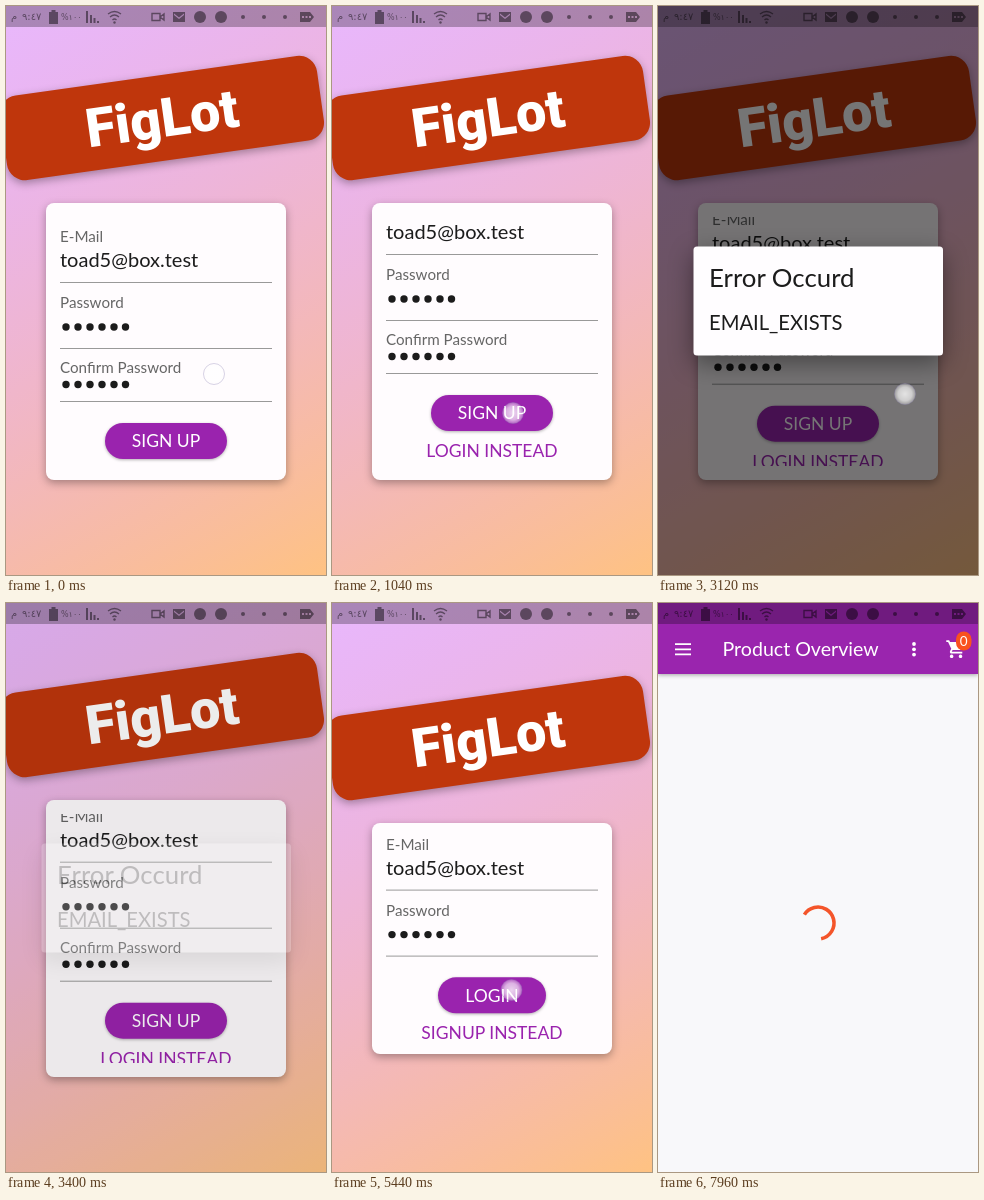
An HTML page that plays this animation: 320x569 px, repeating every 8000 ms.

```html
<!DOCTYPE html>
<html lang="en">
<head>
<meta charset="utf-8">
<style>
  html, body { margin: 0; width: 100%; height: 100%; overflow: hidden; background: #fafafa; }
  svg { display: block; width: 100vw; height: 100vh; font-family: Lato, sans-serif; }
  .label { font-size: 15.2px; fill: #666; }
  .action { font-size: 17.5px; text-anchor: middle; }
  .line { stroke: #999; stroke-width: 1; }
  .brand { font: 900 54px Roboto, sans-serif; text-anchor: middle; fill: #fff; }
  .clock { font: 10px "DejaVu Sans", sans-serif; direction: ltr; unicode-bidi: bidi-override; }
  .raised { filter: drop-shadow(0 3px 4px rgba(0, 0, 0, .32)); }
  .low { filter: drop-shadow(0 1.5px 1.5px rgba(0, 0, 0, .3)); }
  .dialog { filter: drop-shadow(0 8px 12px rgba(0, 0, 0, .4)); }
</style>
</head>
<body>
<svg viewBox="0 0 320 569" preserveAspectRatio="none">
  <defs>
    <linearGradient id="sky" gradientUnits="userSpaceOnUse" x1="0" y1="0" x2="320" y2="569">
      <stop stop-color="#d775ff" stop-opacity=".5"/>
      <stop offset="1" stop-color="#ffbc75" stop-opacity=".9"/>
    </linearGradient>
    <radialGradient id="glow">
      <stop stop-color="#fff" stop-opacity=".8"/>
      <stop offset=".65" stop-color="#fff" stop-opacity=".65"/>
      <stop offset="1" stop-color="#fff" stop-opacity=".3"/>
    </radialGradient>
    <clipPath id="viewport"><rect id="clip" x="50" width="220"/></clipPath>
    <g id="dots">
      <circle cx="60" r="3.7"/><circle cx="72" r="3.7"/><circle cx="84" r="3.7"/>
      <circle cx="96" r="3.7"/><circle cx="108" r="3.7"/><circle cx="119.5" r="3.7"/>
    </g>
  </defs>

  <g id="auth">
    <rect width="320" height="569" fill="#fafafa"/>
    <rect width="320" height="569" fill="url(#sky)"/>
    <g id="banner" class="raised">
      <g transform="translate(156 112) rotate(-8)">
        <rect x="-160" y="-42.7" width="320" height="85.4" rx="18" fill="#bf360c"/>
        <text class="brand" y="19">FigLot</text>
      </g>
    </g>
    <rect id="card" class="raised" x="40" width="240" rx="8" fill="#fffcfe"/>
    <g clip-path="url(#viewport)">
      <g id="form">
        <text class="label" x="54" y="236">E-Mail</text>
        <text x="54" y="261" font-size="20" fill="#1c1c1c">toad5@box.test</text>
        <path class="line" d="M54 276.5H266"/>
        <text class="label" x="54" y="302">Password</text>
        <use href="#dots" y="321" fill="#1c1c1c"/>
        <path class="line" d="M54 342.5H266"/>
        <g id="confirm">
          <text class="label" x="54" y="367">Confirm Password</text>
          <use href="#dots" y="378.5" fill="#1c1c1c"/>
          <path class="line" d="M54 395.5H266"/>
        </g>
        <g id="submit">
          <rect id="pill" class="low" y="417" height="36" rx="18" fill="#9a23ae"/>
          <text id="submitText" class="action" x="160" y="441.3" fill="#fff"></text>
        </g>
        <text id="switchText" class="action" x="160" fill="#9a23ae"></text>
      </g>
    </g>
  </g>

  <g id="shop">
    <rect width="320" height="569" fill="#f8f8fa"/>
    <rect width="320" height="71" fill="#9a25ae" style="filter: drop-shadow(0 1px 2px rgba(0, 0, 0, .35))"/>
    <path d="M17 41.2H33M17 46.3H33M17 51.4H33" stroke="#fff" stroke-width="1.8"/>
    <text x="64.5" y="53.3" font-size="19.6" fill="#fff">Product Overview</text>
    <g fill="#fff">
      <circle cx="256" cy="41" r="1.9"/><circle cx="256" cy="46.3" r="1.9"/><circle cx="256" cy="51.6" r="1.9"/>
      <path transform="translate(287.4 35.5) scale(.889)" d="M1 2v2h2l3.6 7.6-1.35 2.4C4.5 15.4 5.5 17 7 17h12v-2H7.4a.25.25 0 0 1-.2-.4l.9-1.6h7.45c.75 0 1.4-.4 1.75-1l3.58-6.5A1 1 0 0 0 20 4H5.2l-.94-2zM7 18a2 2 0 1 0 .01 0zM17 18a2 2 0 1 0 .01 0z"/>
    </g>
    <rect x="298" y="28.5" width="15.5" height="19" rx="7.7" fill="#f9521f"/>
    <text x="305.7" y="43" font-size="13.5" text-anchor="middle" fill="#fff">0</text>
  </g>

  <circle id="spinner" r="16" pathLength="360" fill="none" stroke="#f4552a" stroke-width="3.6"/>

  <rect width="320" height="21" opacity=".27"/>
  <g opacity=".46">
    <text class="clock" x="5" y="14">م</text>
    <text class="clock" x="16" y="14">٩:٤٧</text>
    <path d="M43 6h2.5v-2h4v2H52v12h-9z"/>
    <text class="clock" x="55" y="14" style="font-size: 8px">%١٠٠</text>
    <path d="M80 5v12h2V5zM84 9v8h2V9zM87.5 12v5h2v-5zM91 15v2h2v-2z"/>
    <path d="M102 8q6.5-5 13 0M104 11q4.5-4 9 0M106.500 14q2-2 4 0" fill="none" stroke="#000" stroke-width="1.3"/>
    <circle cx="108.5" cy="16.5" r="1.2"/>
    <path d="M146 7.5h8v7h-8zM154 11l4-3v6z" fill="none" stroke="#000" stroke-width="1.4"/>
    <path fill-rule="evenodd" d="M167 6h12v10h-12zM168 7.500l5 4 5-4v1.500l-5 4-5-4z"/>
    <circle cx="194" cy="11" r="6"/><circle cx="215" cy="11" r="6"/>
    <circle cx="237" cy="11" r="2"/><circle cx="258" cy="11" r="2"/><circle cx="279" cy="11" r="2"/>
    <path fill-rule="evenodd" d="M294 6h10l4 5-4 5h-10zM296 10v2h2v-2zM299.5 10v2h2v-2zM303 10v2h2v-2z"/>
  </g>

  <rect id="barrier" width="320" height="569"/>
  <g id="alert">
    <rect class="dialog" x="35.5" y="240.5" width="249.5" height="109" rx="3.5" fill="#fffdff"/>
    <text x="51" y="281" font-size="25.8" fill="#1c1c1c">Error Occurd</text>
    <text x="51" y="324" font-size="20.2" fill="#1c1c1c">EMAIL_EXISTS</text>
  </g>

  <circle id="touch" r="10.5" fill="url(#glow)" stroke="#8c84b4" stroke-opacity=".35"/>
</svg>

<script>
const LOOP = 8000;
const SWITCH_AT = 4120, SHOP_AT = 6280;
const $ = id => document.getElementById(id);
const clamp = x => Math.min(1, Math.max(0, x));
const mix = (a, b, p) => a + (b - a) * p;
const set = (id, attrs) => {
  for (const name in attrs) $(id).setAttribute(name, attrs[name]);
};
const show = (id, visible) => set(id, { display: visible ? 'inline' : 'none' });

function bezier(x1, y1, x2, y2) {
  const at = (a, b, s) => 3 * a * s * (1 - s) ** 2 + 3 * b * s * s * (1 - s) + s ** 3;
  return x => {
    let lo = 0, hi = 1;
    for (let i = 0; i < 20; i++) {
      const mid = (lo + hi) / 2;
      if (at(x1, x2, mid) < clamp(x)) lo = mid; else hi = mid;
    }
    return at(y1, y2, lo);
  };
}
const standard = bezier(.4, 0, .2, 1);
const easeIn = bezier(.42, 0, 1, 1);
const easeOut = bezier(0, 0, .58, 1);

const touches = [
  { from: 0, to: 540, x: 208, y: t => mix(368, 326, standard((t - 60) / 420)) },
  { from: 960, to: 1120, x: 181, y: () => 407 },
  { from: 3120, to: 3260, x: 247, y: () => 388 },
  { from: 4000, to: 4140, x: 165, y: () => 453 },
  { from: 5440, to: 5580, x: 179.5, y: () => 387 }
];

// Indeterminate material spinner: the head runs ahead, then the tail catches up.
function drawSpinner(x, y, elapsed) {
  const phase = elapsed / 1333 % 1;
  const head = standard(phase * 2), tail = standard(phase * 2 - 1);
  const start = -90 + 270 * tail + 360 * elapsed / 2222 + 90 * phase;
  const sweep = Math.max(270 * (head - tail), .1);
  set('spinner', {
    transform: `translate(${x} ${y}) rotate(${start})`,
    'stroke-dasharray': `${sweep} 720`
  });
}

function drawForm(t) {
  const login = t >= SWITCH_AT;
  const p = easeIn((t - SWITCH_AT) / 300);
  const loadingSince = t >= 1120 && t < 2040 ? 1120 : t >= 5560 ? 5560 : 0;
  const lift = login ? -53.3 : 0;
  const top = mix(197, 220, p), height = mix(277, 231, p);
  const scroll = t < 1120 ? 28 * standard((t - 100) / 400)
    : login && loadingSince ? 10 : mix(17.3, 12.4, p);
  const shift = 23 * p - scroll;
  const width = login ? 108 : 122;

  set('banner', { transform: `translate(0 ${23 * p})` });
  set('card', { y: top, height });
  set('clip', { y: top + 14, height: height - 28 });
  set('form', { transform: `translate(0 ${shift})` });
  set('submit', { transform: `translate(0 ${lift})` });
  set('pill', { x: 160 - width / 2, width });
  set('switchText', { y: 479 + lift - (loadingSince ? 10.7 : 0) });
  $('submitText').textContent = login ? 'LOGIN' : 'SIGN UP';
  $('switchText').textContent = login ? 'SIGNUP INSTEAD' : 'LOGIN INSTEAD';
  show('confirm', !login);
  show('submit', !loadingSince);
  show('spinner', loadingSince);
  if (loadingSince) {
    const now = login ? t : Math.min(t, 1880);
    drawSpinner(160, 429.7 + lift + shift, now - loadingSince);
  }
}

function draw(t) {
  const inShop = t >= SHOP_AT;
  show('auth', !inShop);
  show('shop', inShop);
  if (inShop) {
    show('spinner', true);
    drawSpinner(160, 320, t - SHOP_AT + 25);
  } else {
    drawForm(t);
  }

  const alert = Math.min(clamp((t - 2000) / 80), clamp((3420 - t) / 140));
  set('barrier', { opacity: .54 * alert });
  set('alert', { opacity: easeOut(alert) });

  const touch = touches.find(({ from, to }) => t >= from && t < to);
  show('touch', touch);
  if (touch) set('touch', { cx: touch.x, cy: touch.y(t) });
}

function tick() {
  draw(performance.now() % LOOP);
  requestAnimationFrame(tick);
}
tick();
</script>
</body>
</html>
```
